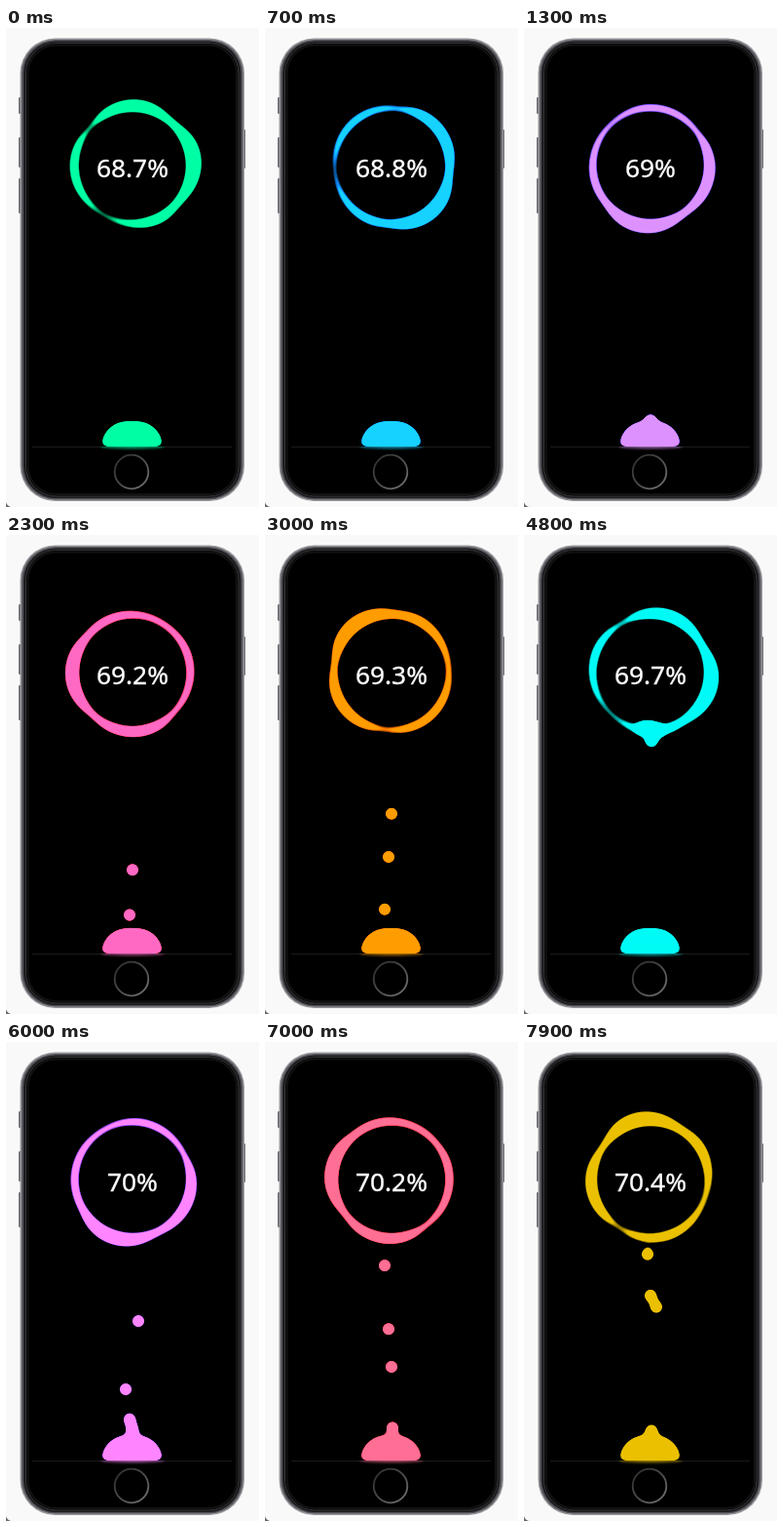
Recreate the animation shown at these times as an HTML page. Size 260 by 491 pixels, loop 8 s.

```html
<!DOCTYPE html>
<html lang="en">
<head>
<meta charset="utf-8">
<title>Charging</title>
<style>
  html, body { margin: 0; width: 100%; height: 100%; overflow: hidden; background: #f9f9f9; }
  svg { position: absolute; left: 0; top: 0; }
  div, i { position: absolute; }
  #hue { left: 30px; top: 50px; width: 200px; height: 379px; }
  #liquid { inset: 0; overflow: hidden; background: #000; filter: contrast(13); }
  #ring { inset: 0; filter: blur(5.3px); }
  #blob {
    left: 37.5px; top: 26.5px; width: 127px; height: 127px;
    transform-origin: 62.5px 64px; background: #00ff6f;
  }
  #hole { left: 45px; top: 35.5px; width: 110px; height: 110px; border-radius: 50%; background: #000; }
  #pool {
    left: 68.2px; top: 352.5px; width: 63px; height: 26.5px;
    border-radius: 63px 63px 0 0; background: #00ff6f; filter: blur(3.8px);
  }
  #pool i {
    top: 7.7px; width: 13.6px; height: 13.6px; margin-left: -6.8px;
    border-radius: 50%; background: #00ff6f;
  }
  #glow {
    left: 67px; top: 376px; width: 66px; height: 5px;
    border-radius: 50%; background: #0f0; opacity: .65; filter: blur(1.5px);
  }
  #level {
    left: 30px; top: 125px; width: 200px; text-align: center; color: #fff;
    font: 26.3px/36px "Noto Sans", "Open Sans", sans-serif;
    -webkit-text-stroke: .35px #fff;
  }
</style>
</head>
<body>
<svg width="260" height="491" viewBox="0 0 260 491">
  <defs>
    <linearGradient id="home" x2="1" y2="1">
      <stop offset="0" stop-color="#2c2c2c"/>
      <stop offset=".5" stop-color="#4c4c4c"/>
      <stop offset="1" stop-color="#777"/>
    </linearGradient>
  </defs>
  <path d="M0 486V491H5Q1 490 0 486Z" fill="#666"/>
  <g fill="#6a6a70">
    <rect x="13" y="71" width="3" height="17" rx="1"/>
    <rect x="13" y="112" width="3" height="31" rx="1"/>
    <rect x="13" y="154" width="3" height="36" rx="1"/>
    <rect x="243" y="104" width="3" height="40" rx="1"/>
  </g>
  <rect x="14.5" y="10.5" width="230.5" height="474.5" rx="36" fill="#96969b"/>
  <rect x="16" y="12" width="227.5" height="471.5" rx="34.5" fill="#55555b"/>
  <rect x="18" y="13.5" width="223.5" height="468.5" rx="33" fill="#1c1c1f"/>
  <rect x="20.5" y="15.5" width="218.5" height="464.5" rx="31" stroke="#343438"/>
  <rect x="22.5" y="17.5" width="214.5" height="460.5" rx="29" stroke="#121213" stroke-width="2"/>
  <path d="M27 429.5H232" stroke="#1a1a1a"/>
  <circle cx="129" cy="455" r="17.3" fill="#000" stroke="url(#home)" stroke-width="1.8"/>
</svg>
<div id="hue">
  <div id="glow"></div>
  <div id="liquid">
    <div id="ring"><div id="blob"></div><div id="hole"></div></div>
    <div id="pool"></div>
  </div>
</div>
<div id="level"></div>
<script>
const LOOP = 8000, TURN = 4570, LEAD = 520, TICK = 457;
const $ = id => document.getElementById(id);
const tracks = [];

function track(el, frames, duration, delay) {
  const anim = el.animate(frames, { duration, delay, iterations: Infinity });
  anim.pause();
  tracks.push(anim);
}

const rest = '42% 38% 62% 49% / 45%';
const bent = '45% 41% 47% 46% / 42% 38% 49% 49%';
track($('hue'), { filter: ['hue-rotate(0deg)', 'hue-rotate(360deg)'] }, TURN, -LEAD);
track($('blob'), { transform: ['rotate(0deg)', 'rotate(360deg)'] }, TURN, -LEAD);
track($('blob'), { borderRadius: [rest, bent, rest] }, TURN, -LEAD);

// Bubbles: x in the pool, first start, rise time
const bubbles = [
  [31.6, 472, 4570],
  [28.8, 1404, 3656],
  [25, 2263, 2742],
  [37.6, 3163, 1828],
  [33, 4060, 914]
];
for (const [x, start, rise] of bubbles) {
  const dot = document.createElement('i');
  dot.style.left = x + 'px';
  $('pool').append(dot);
  const easing = 'ease-in-out';
  track(dot, { transform: ['translateY(0)', 'translateY(-222px)'], easing }, rise, start);
  track(dot, { opacity: [1, 1, .1], offset: [0, .9, 1], easing }, rise, start);
}

function draw() {
  const t = performance.now() % LOOP;
  for (const anim of tracks) anim.currentTime = t;
  $('level').textContent = (687 + Math.floor(t / TICK + .18)) / 10 + '%';
  requestAnimationFrame(draw);
}
draw();
</script>
</body>
</html>
```
